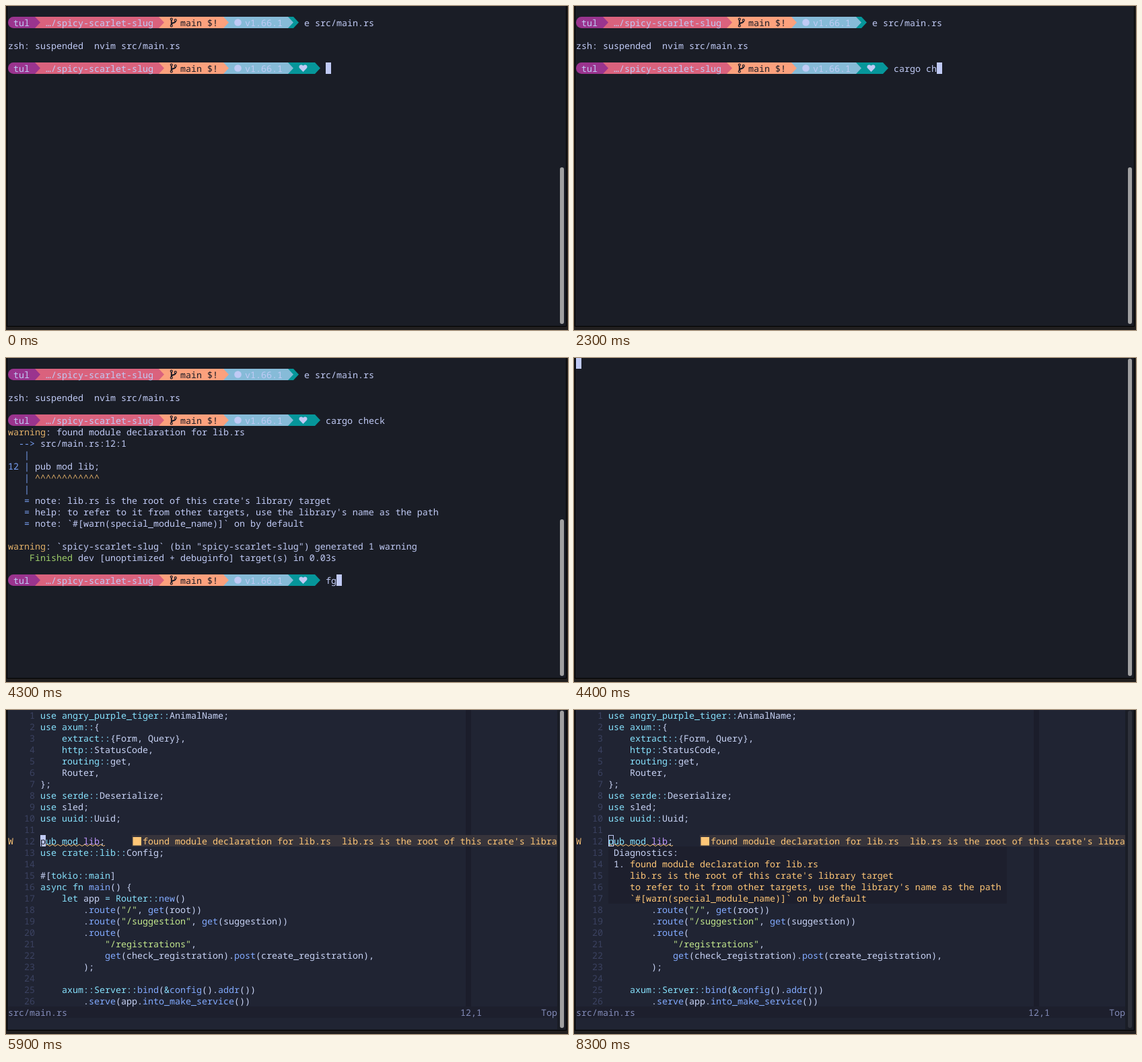
These frames come from a looping animation (835 by 482 pixels, 8.4 s). An HTML page:

```html
<!DOCTYPE html>
<html lang="en">
<head>
<meta charset="utf-8">
<title>Terminal session</title>
<style>
  html, body { margin: 0; width: 100%; height: 100%; overflow: hidden; background: #211f1f; }
  svg { display: block; width: 835px; height: 482px; }
  text {
    font: 13.3333px "Noto Sans Mono", "DejaVu Sans Mono", monospace;
    white-space: pre;
    text-rendering: geometricPrecision;
  }
</style>
</head>
<body>
<svg id="stage" viewBox="0 0 835 482" xmlns="http://www.w3.org/2000/svg"></svg>
<script>
const LOOP = 8400;
const CELL = 8, LINE = 17;
const stage = document.getElementById('stage');
const colX = col => 3 + col * CELL;
const rowY = row => row * LINE - 1;

const BG = '#1a1d26', EDIT_BG = '#202433', PANEL = '#1d1f2d', FG = '#c0caf5';

// Markup "~x" switches to style x: [color, bold, italic].
const STYLES = {
  t: [FG], T: [FG, true], d: ['#1a1b26'],
  w: ['#e0af68', true], b: ['#7aa2f7', true], g: ['#9ece6a', true],
  f: ['#c8d3f5'], F: ['#c8d3f5', true], k: ['#86e1fc', false, true], c: ['#86e1fc'],
  o: ['#89ddff'], m: ['#82aaff'], s: ['#c3e88d'], p: ['#c099ff'],
  y: ['#ffc777'], n: ['#3b4261'], l: ['#828bb8']
};

function add(parent, tag, attrs) {
  const el = document.createElementNS('http://www.w3.org/2000/svg', tag);
  for (const name in attrs) el.setAttribute(name, attrs[name]);
  return parent.appendChild(el);
}
const group = parent => add(parent, 'g', {});
const rect = (parent, x, y, width, height, fill, rx = 0) =>
  add(parent, 'rect', { x, y, width, height, fill, rx });
const show = (el, on) => el.setAttribute('display', on ? 'inline' : 'none');

function write(parent, row, col, markup) {
  for (const part of markup.split('~').slice(1)) {
    const [fill, bold, italic] = STYLES[part[0]];
    const body = part.slice(1);
    const el = add(parent, 'text', {
      x: colX(col), y: rowY(row) + 14, fill,
      'font-weight': bold ? 700 : 400, 'font-style': italic ? 'italic' : 'normal'
    });
    el.textContent = body;
    col += body.length;
  }
}

function prompt(parent, row, hasJobs) {
  const y = rowY(row), mid = y + LINE / 2;
  const segments = [
    [11, 43, '#9a348e'], [43, 227, '#da627d'], [227, 323, '#fca17d'],
    [323, 419, '#86bbd8'], [419, hasJobs ? 459 : 427, '#06969a']
  ];
  for (const [from, to, fill] of segments.reverse())
    add(parent, 'path', { d: `M${from} ${y}H${to}L${to + 8} ${mid}L${to} ${y + LINE}H${from}Z`, fill });
  add(parent, 'path', { d: `M11 ${y}A8 8.5 0 0 0 11 ${y + LINE}Z`, fill: '#9a348e' });
  write(parent, row, 1, '~ttul');
  write(parent, row, 7, '~t…/spicy-scarlet-slug');
  write(parent, row, 32, '~dmain $!');
  write(parent, row, 44, '~tv1.66.1');

  const branch = add(parent, 'g', {
    transform: `translate(243 ${y})`, fill: 'none', stroke: '#1a1b26', 'stroke-width': 1.2
  });
  for (const [cx, cy] of [[2.8, 3.6], [2.8, 13.4], [8.8, 5.2]]) add(branch, 'circle', { cx, cy, r: 1.5 });
  add(branch, 'path', { d: 'M2.8 5V12M8.8 6.7C8.8 9.8 3 8.2 2.8 11.5', 'stroke-width': 1.9 });

  add(parent, 'circle', { cx: 344.5, cy: mid, r: 5.3, fill: FG });
  if (hasJobs) add(parent, 'path', {
    transform: `translate(435 ${y})`, fill: FG,
    d: 'M6.5 14L1.2 8.6C-1 6 2 1.2 6.5 4.8C11 1.2 14 6 11.8 8.6Z'
  });
}

// Window
rect(stage, 1, 0, 832, 477, '#000');
rect(stage, 2, 0, 830, 476, BG);

// Shell
const shell = group(stage);
prompt(shell, 1, false);
write(shell, 1, 55, '~te src/main.rs');
write(shell, 3, 0, '~tzsh: suspended  nvim src/main.rs');
prompt(shell, 5, true);
const COMMAND = 'cargo check';
const typed = add(shell, 'text', { x: colX(59), y: rowY(5) + 14, fill: FG });

const output = group(shell);
[
  '~wwarning~T: found module declaration for lib.rs',
  '~b  --> ~tsrc/main.rs:12:1',
  '~b   |',
  '~b12 | ~tpub mod lib;',
  '~b   | ~w^^^^^^^^^^^^',
  '~b   |',
  "~b   = ~Tnote~t: lib.rs is the root of this crate's library target",
  "~b   = ~Thelp~t: to refer to it from other targets, use the library's name as the path",
  '~b   = ~Tnote~t: `#[warn(special_module_name)]` on by default',
  '',
  '~wwarning~T:~t `spicy-scarlet-slug` (bin "spicy-scarlet-slug") generated 1 warning',
  '~g    Finished~t dev [unoptimized + debuginfo] target(s) in 0.03s'
].forEach((markup, i) => write(output, 6 + i, 0, markup));
prompt(output, 19, true);
const resume = group(output);
write(resume, 19, 59, '~tfg');

// Editor
const CODE = [
  '~kuse ~cangry_purple_tiger~o::~fAnimalName;',
  '~kuse ~caxum~o::~f{',
  '~c    extract~o::~f{Form, Query},',
  '~c    http~o::~fStatusCode,',
  '~c    routing~o::~fget,',
  '~f    Router,',
  '~f};',
  '~kuse ~cserde~o::~fDeserialize;',
  '~kuse ~fsled;',
  '~kuse ~cuuid~o::~fUuid;',
  '',
  '~kpub mod ~plib~f;',
  '~kuse ~ccrate~o::~clib~o::~fConfig;',
  '',
  '~f#[~ctokio~o::~cmain~f]',
  '~casync ~kfn ~mmain~f() {',
  '~c    let ~fapp ~o= ~cRouter~o::~mnew~f()',
  '~f        .~mroute~f(~s"/"~f, ~mget~f(root))',
  '~f        .~mroute~f(~s"/suggestion"~f, ~mget~f(suggestion))',
  '~f        .~mroute~f(',
  '~s            "/registrations"~f,',
  '~m            get~f(check_registration).~mpost~f(create_registration),',
  '~f        );',
  '',
  '~c    axum~o::~cServer~o::~mbind~f(~o&~mconfig~f().~maddr~f())',
  '~f        .~mserve~f(app.~minto_make_service~f())'
];
const plain = markup => markup.replace(/~./g, '');
const warnY = rowY(11);

const editor = group(stage);
rect(editor, 3, 0, 816, 475, EDIT_BG);
rect(editor, 683, 0, 8, 441, '#1b1d2b');
rect(editor, 3, 441, 816, 17, PANEL);
rect(editor, 187, warnY, 632, LINE, '#37343b');
const selection = rect(editor, 51, warnY, 104, LINE, '#2d3f76');
CODE.forEach((markup, row) => {
  write(editor, row, 3, '~n' + String(row + 1).padStart(2));
  write(editor, row, 6, markup);
});
write(editor, 11, 0, '~yW');
rect(editor, 188.5, warnY + 3, 12.5, 12.5, '#ffc777');
write(editor, 11, 25, "~yfound module declaration for lib.rs  lib.rs is the root of this crate's libra");
add(editor, 'path', {
  d: `M51 ${warnY + 15.2}q2 -2.6 4 0t4 0` + 't4 0t4 0'.repeat(11),
  fill: 'none', stroke: '#ffc777', 'stroke-width': 1
});
write(editor, 26, 0, '~lsrc/main.rs');
write(editor, 26, 99, '~lTop');
const position = add(editor, 'text', { x: colX(84), y: rowY(26) + 14, fill: STYLES.l[0] });

const mode = group(editor);
write(mode, 27, 0, '~F-- VISUAL LINE --');
write(mode, 27, 91, '~f1');

const popup = group(editor);
rect(popup, 51, rowY(12), 592, 5 * LINE, PANEL);
write(popup, 12, 7, '~FDiagnostics:');
write(popup, 13, 7, '~f1.');
[
  'found module declaration for lib.rs',
  "lib.rs is the root of this crate's library target",
  "to refer to it from other targets, use the library's name as the path",
  '`#[warn(special_module_name)]` on by default'
].forEach((line, i) => write(popup, 13 + i, 10, '~y' + line));

// Cursor and scrollbar
const cursor = rect(stage, 0, 0, CELL, LINE, FG);
const cursorGlyph = add(stage, 'text', { fill: BG, 'font-style': 'italic' });
const hollow = add(stage, 'rect', {
  x: 51.5, y: warnY + .5, width: 7, height: 16, fill: 'none', stroke: FG
});
const scrollbar = rect(stage, 823, 0, 6, 0, '#a0a0a1', 3);

// Value of the last [time, value] step reached.
const stepAt = (steps, t) => steps.reduce((value, [at, next]) => t >= at ? next : value, 0);
const TYPING = [[900, 2], [1100, 3], [1200, 4], [1300, 5], [1500, 6], [2100, 7], [2300, 8], [2400, 10], [2600, 11]];
const EDIT_ROW = [[4500, 1], [5200, 2], [5700, 5], [5800, 9], [5900, 12]];

function cursorCell(t, count, line) {
  if (t < 2800) return [59 + count, 5];
  if (t < 2900) return [0, 6];
  if (t < 4300) return [59, 19];
  if (t < 4400) return [61, 19];
  if (t < 4500) return [0, 0];
  return [6, line - 1];
}

function render(t) {
  const count = stepAt(TYPING, t), line = stepAt(EDIT_ROW, t);
  const editing = t >= 4500, blurred = t >= 8300;
  const visual = t >= 6300 && t < 6800;

  show(shell, t < 4400);
  show(output, t >= 2900);
  show(resume, t >= 4300);
  typed.textContent = COMMAND.slice(0, count);

  show(editor, editing);
  show(popup, t >= 6200);
  show(selection, visual);
  show(mode, visual);
  position.textContent = line + ',1';

  const [col, row] = cursorCell(t, count, line);
  cursor.setAttribute('x', colX(col));
  cursor.setAttribute('y', rowY(row));
  cursorGlyph.setAttribute('x', colX(col));
  cursorGlyph.setAttribute('y', rowY(row) + 14);
  cursorGlyph.textContent = editing ? plain(CODE[line - 1])[0] : '';
  show(cursor, !blurred);
  show(cursorGlyph, editing && !blurred);
  show(hollow, blurred);

  const top = t < 4400 ? 240 : 1;
  scrollbar.setAttribute('y', top);
  scrollbar.setAttribute('height', 473 - top);
  scrollbar.setAttribute('fill', blurred ? '#2f323c' : '#a0a0a1');
}

const start = performance.now();
function tick() {
  render((performance.now() - start) % LOOP);
  requestAnimationFrame(tick);
}
tick();
</script>
</body>
</html>
```
